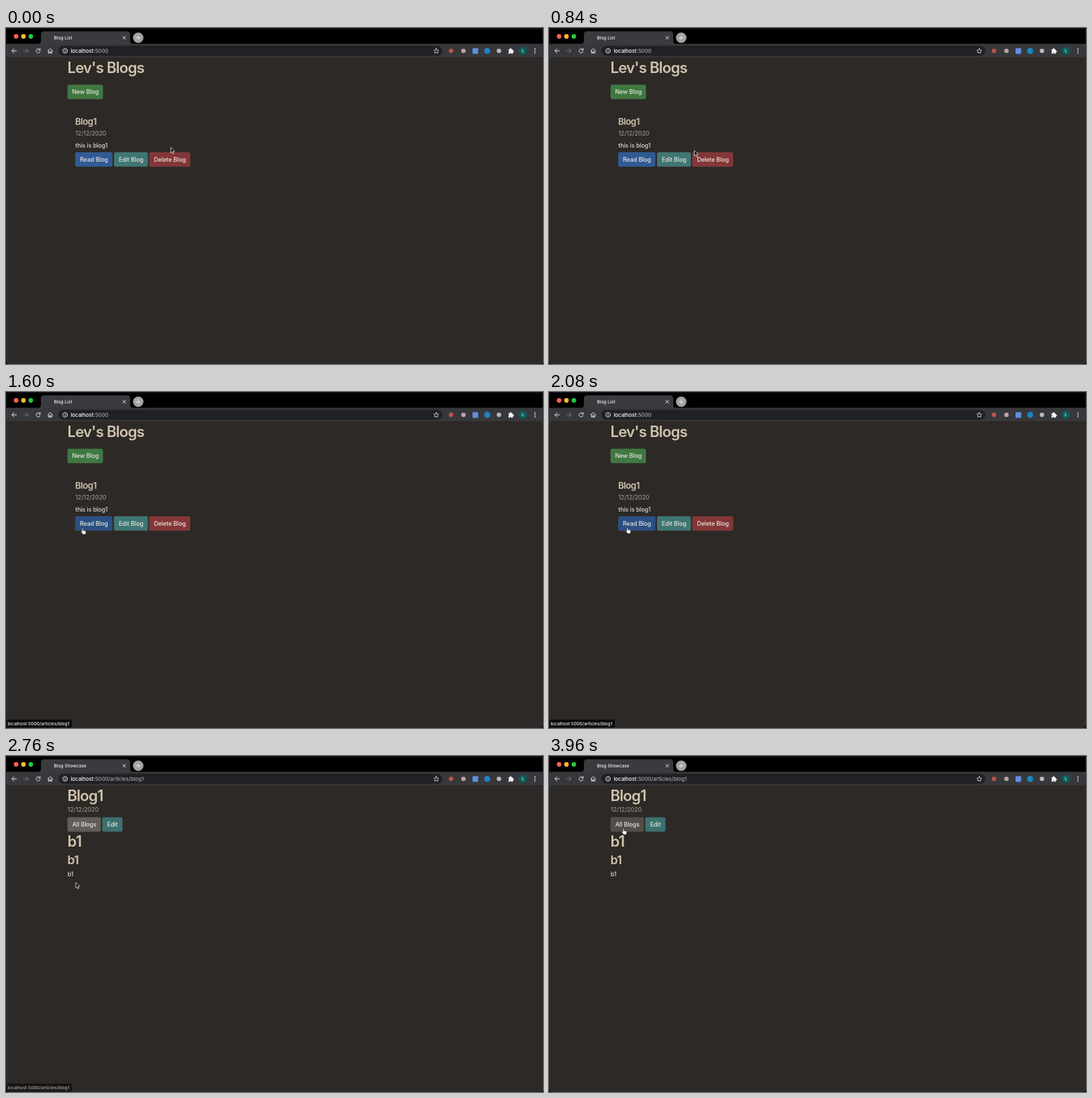
Write an HTML page that moves like this. It is 800x500 px and loops after 4 s.

```html
<!DOCTYPE html>
<html lang="en">
<head>
<meta charset="utf-8">
<title>Blog demo</title>
<style>
  html, body { margin: 0; width: 100%; height: 100%; overflow: hidden; background: #2d2926; }
  svg { display: block; width: 100vw; height: 100vh; }
  text { font-family: Inter, "Open Sans", sans-serif; font-size: 8.88px; font-weight: 450; letter-spacing: -.1px; fill: #ddd9d2; white-space: pre; }
  .h1, .h2, .h4 { fill: #d0c4ae; font-weight: 600; letter-spacing: -.035em; }
  .h1 { font-size: 22.2px; }
  .h2 { font-size: 17.76px; }
  .h4 { font-size: 13.3px; }
  .date { fill: #999084; }
  .label { text-anchor: middle; fill: #e8e4dd; }
  .tab { font-size: 6.6px; font-weight: 500; letter-spacing: 0; fill: #eef0f2; }
  .url { font-size: 7.8px; letter-spacing: 0; fill: #fff; }
  .path { fill: #a3a6aa; }
  .icon { fill: none; stroke: #e4e6e8; stroke-width: 1; stroke-linecap: round; stroke-linejoin: round; }
</style>
</head>
<body>
<svg viewBox="0 0 800 500">
  <rect width="800" height="500" fill="#2d2926"/>

  <g id="listPage">
    <text class="h1" x="91.4" y="66.7">Lev's Blogs</text>
    <rect x="92" y="119.5" width="616" height="98.5" rx="2" fill="none" stroke="#38332f" stroke-width=".7"/>
    <text class="h4" x="102.9" y="143.7">Blog1</text>
    <text class="date" x="103.2" y="159.7">12/12/2020</text>
    <text x="103.3" y="177.6">this is blog1</text>
  </g>

  <g id="blogPage">
    <text class="h1" x="91.4" y="66.7">Blog1</text>
    <text class="date" x="91.8" y="83.4">12/12/2020</text>
    <text class="h1" x="91.4" y="134.7">b1</text>
    <text class="h2" x="91.4" y="161.1">b1</text>
    <text x="91.7" y="179">b1</text>
  </g>

  <!-- browser window -->
  <rect width="800" height="24" fill="#000"/>
  <path d="M47 24q5 0 5-5v-9q0-5 5-5h123q5 0 5 5v9q0 5 5 5z" fill="#3a3b3e"/>
  <rect y="23.5" width="800" height="20" fill="#37383b"/>
  <rect x="78" y="26.5" width="572" height="15" rx="7.5" fill="#202124"/>
  <circle cx="15" cy="12.5" r="3.4" fill="#fc5d56"/>
  <circle cx="26" cy="12.5" r="3.4" fill="#fdbb2e"/>
  <circle cx="37" cy="12.5" r="3.4" fill="#2ac440"/>
  <text id="tabTitle" class="tab" x="71.4" y="17"></text>
  <circle cx="197" cy="14.5" r="7.8" fill="#a3a3a3"/>
  <path class="icon" d="M174 12.4l4.2 4.2M178.2 12.4l-4.2 4.2M194 14.5h6M197 11.5v6"/>
  <path class="icon" d="M15.5 34h-6.5M12 30.8l-3.2 3.2 3.2 3.2"/>
  <path class="icon" style="stroke:#77797c" d="M26.5 34h6.5M30 30.8l3.2 3.2-3.2 3.2"/>
  <path class="icon" d="M50.8 35.2a3.1 3.1 0 1 1-.7-3.5M51 30.6v2.4h-2.4"/>
  <path class="icon" d="M62.2 34l3.6-3.4 3.6 3.4M63.3 33.6v3.8h1.8v-2.3h1.4v2.3h1.8v-3.8"/>
  <circle class="icon" cx="88" cy="34" r="3.4"/>
  <path class="icon" d="M88 33.8v1.8M88 32.2v.1"/>
  <text class="url" x="96.4" y="36.9">localhost<tspan id="urlPath" class="path"></tspan></text>
  <path class="icon" style="stroke-width:.8" d="M641 30.4l1.1 2.4 2.6.3-1.9 1.8.5 2.6-2.3-1.3-2.3 1.3.5-2.6-1.9-1.8 2.6-.3z"/>
  <circle cx="663" cy="34" r="3.3" fill="#b9584a"/>
  <circle cx="681.5" cy="34" r="3.3" fill="#b9a3a3"/>
  <rect x="695" y="30" width="8.4" height="8.4" rx="1" fill="#5f8fdd"/>
  <circle cx="716.8" cy="34" r="4.5" fill="#1d83c6"/>
  <circle cx="734.4" cy="34" r="3.3" fill="#b5b7ba"/>
  <path d="M748.6 31.8h2v-.6a1.2 1.2 0 0 1 2.4 0v.6h2v2h.5a1.2 1.2 0 0 1 0 2.4h-.5v2h-2.1a1.2 1.2 0 0 0-2.3 0h-2v-2.2a1.2 1.2 0 0 0 0-2.2z" fill="#f1f3f4"/>
  <circle cx="770" cy="34" r="6" fill="#075f5b"/>
  <text class="tab" x="770" y="36.4" text-anchor="middle">L</text>
  <g fill="#e4e6e8">
    <circle cx="788" cy="31" r=".9"/><circle cx="788" cy="34" r=".9"/><circle cx="788" cy="37" r=".9"/>
  </g>

  <g id="status">
    <path d="M0 487.5h95.500q2.500 0 2.500 2.500v9.500H0z" fill="#0b0a0a"/>
    <text class="tab" x="2.4" y="495.8">localhost:5000/articles/blog1</text>
  </g>

  <!-- window edge -->
  <path d="M0 0H800V500H0zM5.500.5h789q5 0 5 5v489q0 5-5 5h-789q-5 0-5-5v-489q0-5 5-5z" fill="#0a0f18" fill-rule="evenodd"/>
  <rect x=".9" y=".9" width="798.2" height="498.2" rx="4.6" fill="none" stroke="#fff" stroke-opacity=".12" stroke-width=".7"/>

  <g id="arrow">
    <path d="M0 0v8l1.800-1.600 1.300 2.900 1.400-.6-1.300-2.900h2.500z" fill="#000" stroke="#fff" stroke-width=".75" stroke-linejoin="round"/>
  </g>
  <g id="hand">
    <path d="M-1 .6q0-.9.9-.9t.9.9v2.500q.8-.6 1.500.2.900-.5 1.400.3 1-.2 1.100.8v1.800q0 1-.8 1.800v.8H-.2v-.7l-2.600-3.300q-.3-.9.5-1t1.300.8z" fill="#fff" stroke="#111" stroke-width=".6" stroke-linejoin="round"/>
  </g>
</svg>

<script>
const LOOP = 4000, STEP = 40, PAGE_CHANGE = 2440;
const $ = id => document.getElementById(id);
const clamp = v => Math.max(0, Math.min(1, v));

// time, x, y of the pointer's hot spot
const pointerPath = [
  [0, 245.5, 177.8], [560, 279.7, 169], [640, 279.7, 169],
  [1120, 112, 204.2], [1160, 112, 204.2], [2080, 117, 202], [2400, 117, 202],
  [2760, 104, 188.3], [3240, 147.5, 90.6], [3440, 147.5, 90.6],
  [3900, 111, 108.3], [4000, 111, 108.3]
];

const buttons = [];
function addButton(page, label, x, y, width, color, hoverColor) {
  const height = 21.3;
  $(page).insertAdjacentHTML("beforeend",
    `<g><rect x="${x}" y="${y}" width="${width}" height="${height}" rx="2.2"
      stroke="#fff" stroke-opacity=".08" stroke-width=".6"/>
     <text class="label" x="${x + width / 2 + .2}" y="${y + 14}">${label}</text></g>`);
  const rect = $(page).lastElementChild.firstElementChild;
  buttons.push({ page, rect, x, y, width, height, color, hoverColor });
}
addButton("listPage", "New Blog", 91.7, 84.4, 52.7, "#3f7840", "#356837");
addButton("listPage", "Read Blog", 103.2, 185, 55.2, "#305b95", "#2b5083");
addButton("listPage", "Edit Blog", 161, 185, 50.3, "#3f7674", "#366766");
addButton("listPage", "Delete Blog", 213.5, 185, 60.8, "#833637", "#702e30");
addButton("blogPage", "All Blogs", 91.7, 91.2, 49.5, "#625d58", "#524e49");
addButton("blogPage", "Edit", 143.4, 91.2, 30, "#3b7170", "#326261");

function pointerAt(t) {
  const next = pointerPath.findIndex(p => p[0] > t);
  const [t0, x0, y0] = pointerPath[next - 1], [t1, x1, y1] = pointerPath[next];
  const u = (t - t0) / (t1 - t0), k = u * u * (3 - 2 * u);
  return [x0 + (x1 - x0) * k, y0 + (y1 - y0) * k];
}

function show(id, visible) { $(id).setAttribute("display", visible ? "inline" : "none"); }

function draw(now) {
  const t = Math.floor((now % LOOP) / STEP) * STEP;
  const page = t < PAGE_CHANGE ? "listPage" : "blogPage";
  const onList = page === "listPage";
  show("listPage", onList);
  show("blogPage", !onList);
  $("tabTitle").textContent = onList ? "Blog List" : "Blog Showcase";
  $("urlPath").textContent = onList ? ":5000" : ":5000/articles/blog1";

  const [x, y] = pointerAt(t);
  let hovering = false;
  for (const b of buttons) {
    const over = b.page === page && x >= b.x && x <= b.x + b.width && y >= b.y && y <= b.y + b.height;
    b.rect.setAttribute("fill", over ? b.hoverColor : b.color);
    hovering ||= over;
  }
  show("hand", hovering);
  show("arrow", !hovering);
  $(hovering ? "hand" : "arrow").setAttribute("transform", `translate(${x} ${y})`);

  const fadeIn = clamp((t - 1240) / 160), fadeOut = clamp((t - 2690) / 200);
  $("status").setAttribute("opacity", fadeIn * (1 - fadeOut));
}

function tick(now) {
  draw(now);
  requestAnimationFrame(tick);
}
draw(0);
requestAnimationFrame(tick);
</script>
</body>
</html>
```
